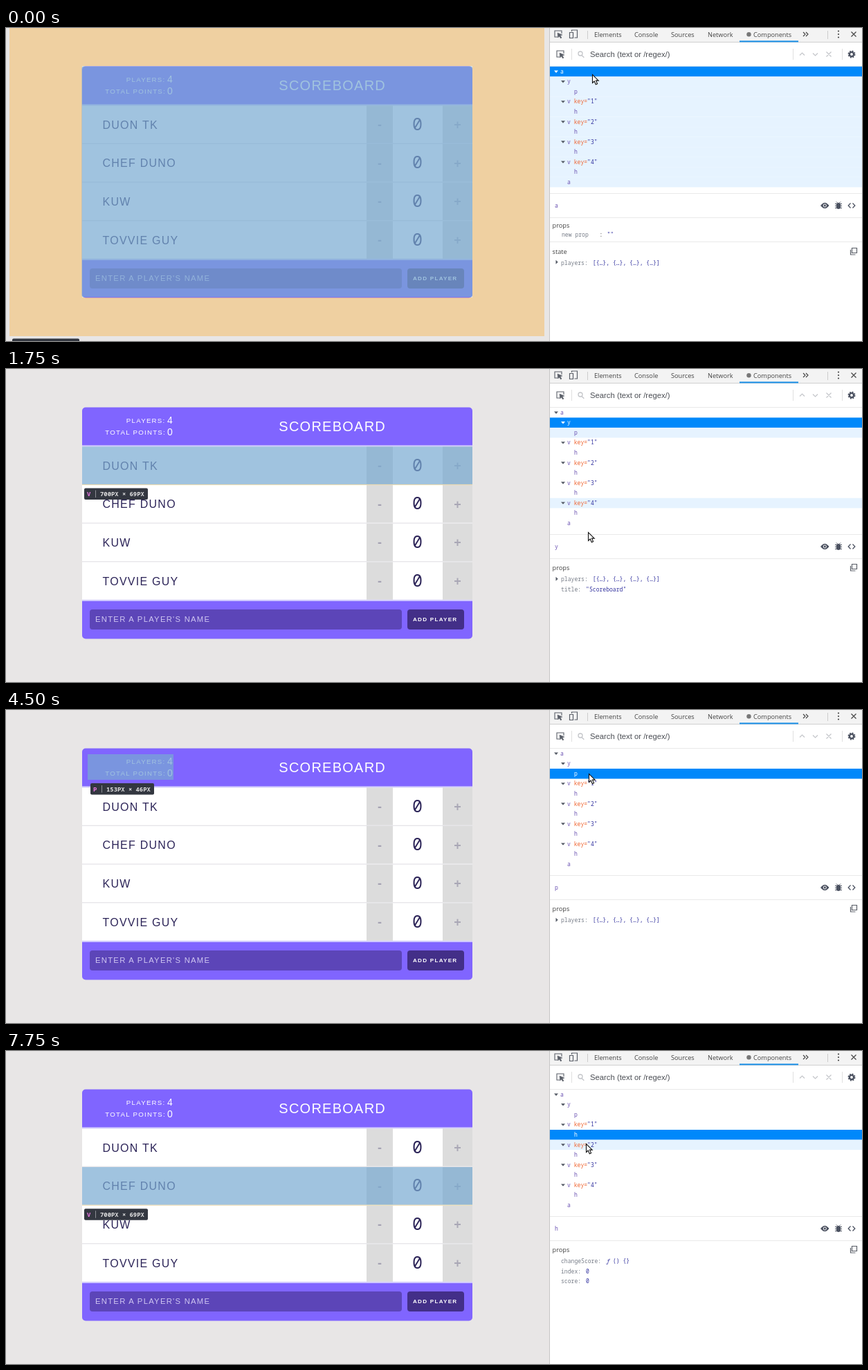
Write an HTML page that moves like this. It is 1237 px wide and 453 px high and loops after 8000 ms.

```html
<!DOCTYPE html>
<html lang="en">
<meta charset="utf-8">
<title>Scoreboard component inspector</title>
<style>
  html, body { margin: 0; width: 100%; height: 100%; overflow: hidden; background: #e8e6e6; }
  svg { display: block; font-family: "Liberation Sans", Arial, sans-serif; }
  .mono { font: 8.08px "Noto Sans Mono", monospace; }
  .ui { font: 9.2px "Open Sans", sans-serif; fill: #444; }
  .tip { font: bold 8.87px "Noto Sans Mono", monospace; }
  .spaced { letter-spacing: 1.25px; }
</style>
<svg id="stage" width="1237" height="453" viewBox="0 0 1237 453"></svg>
<script>
const LOOP = 8000, CHAR = 4.85, PITCH = 55.7;
const C = { purple: '#8065ff', ink: '#2c2458', dim: '#777d88', value: '#33339f', name: '#6a51b2',
  attr: '#ef6632', icon: '#5a5f68', faint: '#c4c6ca', select: '#0088fa', tint: '#e6f3ff',
  content: 'rgba(120,170,210,.7)', padding: 'rgba(77,200,0,.3)',
  margin: 'rgba(255,155,0,.3)', border: 'rgba(255,200,50,.3)' };
const players = ['Duon TK', 'Chef Duno', 'Kuw', 'Tovvie Guy'];
const tree = [[0, 'a'], [1, 'y'], [2, 'p'],
  ...players.flatMap((_, i) => [[1, 'v', i + 1], [2, 'h']]), [1, 'a']];

// Each step overrides the previous state.
const steps = [
  { t: 0, cursor: [847, 67], sel: 0, hover: -1, over: 'a', panel: 'a', blur: false },
  { t: 500, cursor: [847, 78], hover: 1, over: 'y' },
  { t: 750, sel: 1, hover: -1 },
  { t: 1000, panel: 'y' },
  { t: 1750, cursor: [841, 236], hover: 9, over: 'v1' },
  { t: 2000, cursor: [816, 282], hover: -1, over: '' },
  { t: 2250, cursor: [820, 301] },
  { t: 2500, cursor: [820, 302] },
  { t: 2750, cursor: [820, 304], panel: 'open', blur: true },
  { t: 3000, cursor: [816, 290] },
  { t: 3250, cursor: [846, 115], hover: 4, over: 'v2' },
  { t: 3500, cursor: [846, 104], over: 'h1' },
  { t: 3750, cursor: [841, 104], hover: 3, over: 'v1' },
  { t: 4250, cursor: [842, 92], hover: 2, over: 'p' },
  { t: 4500, sel: 2, hover: -1, panel: 'p', blur: false },
  { t: 5250, cursor: [842, 104], hover: 3, over: 'v1' },
  { t: 5500, cursor: [846, 105] },
  { t: 5750, sel: 3, hover: -1, panel: 'v' },
  { t: 6500, cursor: [839, 118], hover: 4, over: 'h1' },
  { t: 6750, sel: 4, hover: -1, panel: 'h' },
  { t: 7750, cursor: [838, 134], hover: 5, over: 'v2' }
];
const states = [];
for (const step of steps) states.push({ ...states.at(-1), ...step });

const rect = (x, y, w, h, fill, r = 0) =>
  `<rect x="${x}" y="${y}" width="${w}" height="${h}" rx="${r}" fill="${fill}"/>`;
const text = (x, y, s, attrs = '') => `<text x="${x}" y="${y}" ${attrs}>${s}</text>`;
const mono = (x, y, s, fill, attrs = '') => text(x, y + 2.8, s, `class="mono" fill="${fill}" ${attrs}`);
const line = (d, color = C.icon, w = 1.2, fill = 'none') =>
  `<path d="${d}" stroke="${color}" stroke-width="${w}" fill="${fill}"/>`;
const rule = (y, color = '#e9e9e9') => line(`M786 ${y}H1237`, color, 1);
const arrow = (x, y, open, fill = '#555b66') =>
  `<path d="M${x} ${y}${open ? 'm-3 -1.5h6l-3 3.4z' : 'm-1.5 -3.2v6l3.2 -3z'}" fill="${fill}"/>`;

function board() {
  const label = (x, y, s, size, attrs = '') =>
    text(x, y, s, `class="spaced" font-size="${size}" ${attrs}`);
  let out = rect(110, 55.5, 564, 335, C.purple, 5) + rect(110, 110.3, 564, 2, '#cfc8ff') +
    rect(110, 112.3, 564, 222, '#e5e4e8') + rect(110, 334, 564, 2, '#cfc8ff') +
    label(230.5, 77.5, 'PLAYERS:', 9.7, 'fill="#fff" text-anchor="end"') +
    label(231, 95, 'TOTAL POINTS:', 9.7, 'fill="#fff" text-anchor="end"') +
    text(233, 79, 4, 'font-size="14" fill="#fff"') + text(233, 96, 0, 'font-size="14" fill="#fff"') +
    label(394.3, 90, 'SCOREBOARD', 20, 'fill="#fff"');
  players.forEach((player, i) => {
    const y = 112.3 + PITCH * i;
    out += rect(110, y, 564, 54.4, '#fff') + rect(521, y, 38, 54.4, '#dcdcdc') + rect(631, y, 43, 54.4, '#dcdcdc') +
      label(139.5, y + 33.3, player.toUpperCase(), 16, `fill="${C.ink}"`) +
      text(594.5, y + 35.3, 0, `font-size="25" text-anchor="middle" fill="${C.ink}" style="font-family:'Noto Sans Mono',monospace"`) +
      text(540, y + 33.5, '-', 'font-size="18" font-weight="bold" text-anchor="middle" fill="#a5a2b3"') +
      text(652.5, y + 33.5, '+', 'font-size="18" font-weight="bold" text-anchor="middle" fill="#a9a7b5"');
  });
  return out + rect(121, 348, 451, 29, '#5c45b8', 4) + rect(580, 348, 82, 29, '#432f88', 4) +
    label(129, 366.3, "ENTER A PLAYER'S NAME", 11.3, 'fill="#cfc6f2"') +
    label(588, 365.4, 'ADD PLAYER', 8.1, 'fill="#fff" font-weight="bold"');
}

const picker = (x, y) => line(`M${x + 5} ${y - 1}v-4h-10v9h4`, C.icon, 1.1) +
  line(`M${x - 1} ${y - 2}l7 3-3 1 2 3-1.4 1-2-3-2 2z`, C.icon, .5, C.icon);
const copyIcon = y => line(`M1222.5 ${y - 4.5}h7v7h-7z`) + line(`M1220.5 ${y - 2}v7h7`, C.icon, 1.2);

function chrome() {
  const tabs = [[850, 'Elements'], [908, 'Console'], [961, 'Sources'], [1014, 'Network'], [1080, 'Components']];
  return rect(785, 0, 452, 453, '#fff') + rect(785, 0, 452, 20, '#f3f3f3') +
    line('M785.5 0V453', '#c6c6c6', 1) + rule(20.5, '#d0d0d0') +
    tabs.map(([x, s]) => text(x, 12.8, s, 'class="ui"')).join('') +
    rect(1060, 18.4, 85, 2, '#1a90e8') + '<circle cx="1073.5" cy="9.3" r="3.2" fill="#777"/>' +
    picker(798, 9) + picker(801, 38) +
    line('M817.5 5v-2h8v11h-4M814.5 6.5h5v8h-5z') +
    line('M1152 6l3 3-3 3M1156 6l3 3-3 3M1221.5 5.5l7 7m0-7l-7 7', '#444') +
    line('M840.5 4v12M1187.5 4v12', '#ccc', 1) +
    [4.5, 9, 13.5].map(y => `<circle cx="1203" cy="${y}" r="1.1" fill="#444"/>`).join('') +
    line('M817.5 30v16M1137.5 30v16M1208.5 30v16', '#e0e0e0', 1) +
    line('M832 39.5l3.3 3.3', C.faint, 1.4) + '<circle cx="830" cy="37" r="3" fill="none" stroke="#c4c6ca" stroke-width="1.3"/>' +
    text(844, 41.5, 'Search (text or /regex/)', 'font-size="11.3" fill="#4c4f55"') +
    line('M1147 39.5l3.5-3.5 3.5 3.5M1166 36.5l3.5 3.5 3.5-3.5M1185.5 34.5l7 7m0-7l-7 7', C.faint) +
    '<circle cx="1222" cy="38" r="3.1" fill="none" stroke="#4b5160" stroke-width="2.4"/>' +
    '<circle cx="1222" cy="38" r="4.7" fill="none" stroke="#4b5160" stroke-width="1.5" stroke-dasharray="2 1.69"/>' +
    rule(55.5) + rule(239.5) + rule(274.5) +
    line('M1177.5 257q5.8-7.5 11.6 0q-5.8 7.5-11.6 0z', '#4b5160', 1, '#4b5160') +
    '<circle cx="1183.3" cy="257" r="2.1" fill="#4b5160" stroke="#fff"/>' +
    rect(1200, 253, 6, 9, '#4b5160', 3) +
    line('M1198 254.5h10M1198 257.5h10M1198 260.5h10M1200 251.5l2 2M1206 251.5l-2 2', '#4b5160', 1) +
    line('M1220.5 253.5l-3.3 3.5 3.3 3.5M1223.5 253.5l3.3 3.5-3.3 3.5', '#4b5160', 1.3);
}

function treeView({ sel, hover, blur }) {
  const depth = tree[sel][0];
  let last = sel;
  while (tree[last + 1] && tree[last + 1][0] > depth) last++;
  return tree.map(([level, name, key], i) => {
    const y = 63 + 14.55 * i, x = 801 + 10 * level, active = i === sel && !blur;
    const inside = i > sel && i <= last;
    const fill = active ? C.select : i === sel ? '#dfdfdf'
      : i === hover ? (inside && !blur ? '#cfe8ff' : C.tint)
      : inside ? (blur ? '#f3f3f3' : C.tint) : '';
    const paint = color => active ? '#fff' : color;
    return (fill && rect(786, y - 7.2, 451, 14.6, fill)) +
      (name === 'h' || name === 'p' || i === tree.length - 1 ? '' : arrow(x - 6, y, true, paint('#555b66'))) +
      mono(x, y, name, paint(C.name), active ? 'font-weight="bold"' : '') +
      (key ? mono(x + 9.7, y, 'key=', paint(C.attr)) + mono(x + 29.1, y, `"${key}"`, paint(C.value)) : '');
  }).join('');
}

function details(panel) {
  const fn = '<tspan font-style="italic">ƒ</tspan> () {}';
  const list = '[{…}, {…}, {…}, {…}]';
  const entry = (x, y, key, value) => mono(x, y, key + ':', C.dim) +
    mono(x + (key.length + 1) * CHAR + 7, y, value, C.value);
  const rows = {
    y: [['players', list], ['title', '"Scoreboard"']],
    p: [['players', list]],
    v: [['changeScore', fn], ['id', 1], ['index', 0], ['name', `"${players[0]}"`], ['removePlayer', fn], ['score', 0]],
    h: [['changeScore', fn], ['index', 0], ['score', 0]]
  };
  rows.open = [rows.y[0], ...players.map((s, i) => [`${i}`, `{id: ${i + 1}, name: "${s}", score: 0}`, 1]), rows.y[1]];
  const title = panel === 'open' ? 'y' : panel;
  let out = mono(panel === 'v' ? 811 : 793, 257, title, C.name);
  if (panel === 'v') out += line('M793 251h11l4 6-4 6h-11z', 'none', 0, '#dedede') + mono(795, 257, 1, '#444');
  if (panel === 'a') {
    return out + text(789.5, 288.7, 'props', 'class="ui"') + mono(803, 299, 'new prop', C.dim) +
      mono(857.5, 299, ':', '#444') + mono(868.5, 299, '""', C.value) + rule(309.5) +
      text(789.5, 326.7, 'state', 'class="ui"') + copyIcon(323) +
      arrow(796, 339, false) + entry(802, 340, 'players', list);
  }
  out += text(789.5, 291, 'props', 'class="ui"') + copyIcon(287);
  rows[panel].forEach(([key, value, nested], i) => {
    const y = 304.5 + 14.2 * i;
    out += entry(nested ? 812 : 802, y, key, value);
    if (nested) out += arrow(806, y - .6, false);
    if (key === 'players') out += arrow(796, y - .6, panel === 'open');
  });
  return out;
}

function tooltip(x, y, name, size) {
  return rect(x, y, 92, 16.5, '#333740', 2) + text(x + 4, y + 11.5, name, 'class="tip" fill="#ee78e6"') +
    line(`M${x + 16.5} ${y + 3}v10.5`, '#8b8e94', 1) + text(x + 23, y + 11.5, size, 'class="tip" fill="#e0e0e0"');
}

function overlay(target) {
  if (!target) return '';
  if (target === 'a') {
    return `<path d="M5 0H778V446H5ZM110 55V390H674V55Z" fill="${C.margin}" fill-rule="evenodd"/>` +
      rect(109.5, 55.5, 564.5, 334, C.content, 3) + rect(9, 449.5, 97, 8, '#333740', 2);
  }
  if (target === 'y') {
    return `<path d="M110 55.5H674V110.5H110ZM118 59.5V107H666V59.5Z" fill="${C.padding}" fill-rule="evenodd"/>` +
      rect(118, 59.5, 548, 47.5, C.content) + rect(110, 110.5, 564, 1.8, C.border) + tooltip(113, 117, 'Y', '700PX × 71PX');
  }
  if (target === 'p') return rect(118, 64, 124, 37, C.content) + tooltip(122, 106, 'P', '153PX × 46PX');
  const y = 112.3 + PITCH * (target[1] - 1);
  return target[0] === 'v'
    ? rect(110, y, 564, 54.6, C.content) + rect(110, y + 54.6, 564, 1.2, C.border) + tooltip(113, y + 60.2, 'V', '700PX × 69PX')
    : rect(521, y, 153, 54.6, C.content) + tooltip(524.5, y + 58.7, 'H', '190PX × 67PX');
}

const pointer = ([x, y]) =>
  `<path transform="translate(${x} ${y})" d="M.5 .5V12.5L3.2 10L5.3 14.8L7.6 13.8L5.5 9.1H9.2Z" fill="#fff" stroke="#111" stroke-width="1.1"/>`;

const stage = document.getElementById('stage');
const fixed = [board(), chrome()];
let shown;
function frame() {
  const t = performance.now() % LOOP;
  const state = states.findLast(s => s.t <= t);
  if (state !== shown) {
    shown = state;
    stage.innerHTML = fixed[0] + overlay(state.over) + fixed[1] +
      treeView(state) + details(state.panel) + pointer(state.cursor);
  }
  requestAnimationFrame(frame);
}
frame();
</script>
</html>
```
